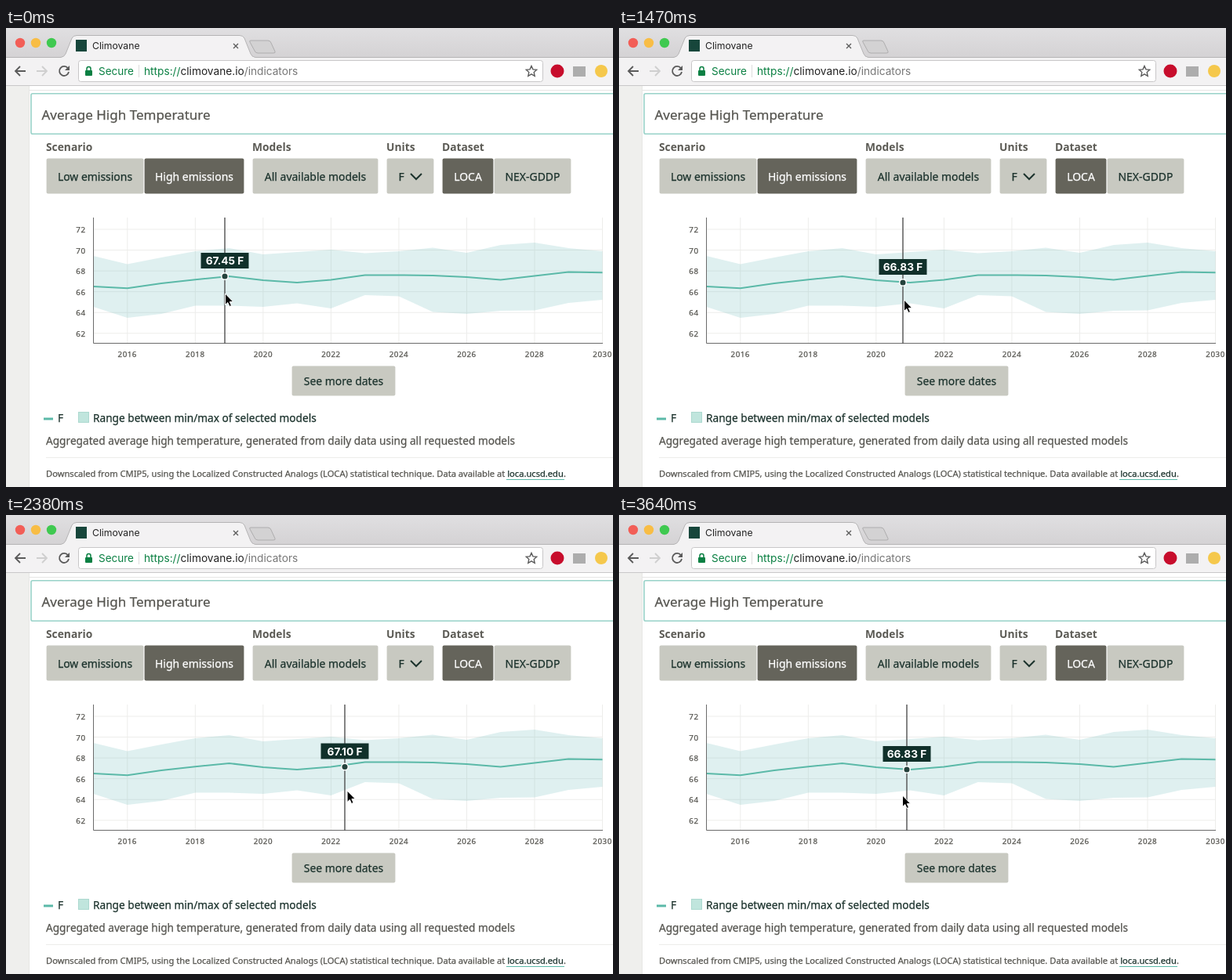
Animation of 774 by 586 pixels, one loop 3.71 s. Source, as an HTML page:

```html
<!DOCTYPE html>
<html lang="en">
<head>
<meta charset="utf-8">
<title>Average High Temperature</title>
<style>
  html, body { margin: 0; width: 774px; height: 586px; overflow: hidden; background: #fff; }
  svg { display: block; font-family: "Noto Sans", "Open Sans", sans-serif; }
  .chrome { font-family: Inter, "Liberation Sans", sans-serif; }
  .label { font-size: 13.8px; font-weight: 700; fill: #5c5b55; }
  .medium { fill: #55544f; stroke: #55544f; stroke-width: .25px; }
  .dark { fill: #1c332d; stroke: #1c332d; }
  .light { fill: #fff; stroke: #fff; }
  .button { font-size: 13.95px; text-anchor: middle; }
  .body { font-size: 13.67px; }
  .tick { font-size: 9.8px; letter-spacing: .5px; }
  .icon { fill: none; stroke: #5a5a5a; stroke-width: 1.8; }
</style>
</head>
<body>
<svg width="774" height="586" viewBox="0 0 774 586">
  <defs>
    <linearGradient id="bar" x2="0" y2="1">
      <stop stop-color="#e0dfe1"/><stop offset="1" stop-color="#d4d2d4"/>
    </linearGradient>
  </defs>

  <g class="chrome">
    <rect width="774" height="38" fill="url(#bar)"/>
    <circle cx="18" cy="19" r="6.2" fill="#f25e57"/>
    <circle cx="38" cy="19" r="6.2" fill="#f8bd45"/>
    <circle cx="58" cy="19" r="6.2" fill="#3fc950"/>
    <path d="M312 16h22q3 0 4 3l5 11q1 2-2 2h-20q-3 0-4-3l-6-11q-1-2 1-2z" fill="#d3d2d3" stroke="#aeadae"/>
    <rect y="37" width="774" height="36" fill="#f3f2f3"/>
    <path d="M0 37.5H70Q74 37 76 33L84 13Q86 9.5 90 9.5H298Q302 9.5 304 13L312 33Q314 37.5 318 37.5H774" fill="#f3f2f3" stroke="#b5b4b5"/>
    <path d="M72 38H316" stroke="#f3f2f3" stroke-width="2"/>
    <rect x="89" y="15" width="14" height="15" fill="#17463b"/>
    <text x="110" y="27" font-size="12.2" fill="#222">Climovane</text>
    <path class="icon" d="M290 20l6 6m0-6l-6 6" style="stroke-width:1.3"/>
    <path class="icon" d="M25 55H12m6-6l-6 6 6 6"/>
    <path class="icon" d="M39 55h13m-6-6l6 6-6 6" style="stroke:#cfcfcf"/>
    <path class="icon" d="M79 51.5A6 6 0 1 0 80 56"/>
    <path d="M81 48v6h-6z" fill="#5a5a5a"/>
    <rect x="92.5" y="41.5" width="592" height="27" rx="3" fill="#fff" stroke="#c8c7c8"/>
    <rect x="101" y="54" width="9" height="7" rx="1" fill="#0b8043"/>
    <path d="M103 54v-2a2.500 2.500 0 0 1 5 0v2" fill="none" stroke="#0b8043" stroke-width="1.5"/>
    <text x="118" y="60" font-size="13.5" fill="#0b8043">Secure</text>
    <path d="M169.5 47v16" stroke="#ddd"/>
    <text x="176" y="60" font-size="13.7" fill="#777"><tspan fill="#0b8043">https://</tspan><tspan fill="#222">climovane.io</tspan>/indicators</text>
    <path class="icon" d="M670 48.500l2 4.400 4.700.5-3.500 3.200 1 4.700-4.200-2.400-4.200 2.400 1-4.700-3.500-3.200 4.700-.5z" style="stroke-width:1.4"/>
    <circle cx="703" cy="55" r="8.5" fill="#c70d2c"/>
    <rect x="723" y="49" width="16" height="13" fill="#adadad"/>
    <circle cx="759" cy="55" r="8" fill="#f5c84c"/>
    <path d="M0 73.5H774" stroke="#c9c8c9"/>
  </g>

  <rect y="74" width="30" height="512" fill="#efefed"/>
  <path d="M29.5 74V586M30 79.5H774" stroke="#e6e6e4"/>
  <rect x="32" y="83.7" width="760" height="51.6" rx="2" fill="#fff" stroke="#98d2c8" stroke-width="1.6"/>
  <text x="45.5" y="117" font-size="17" class="medium">Average High Temperature</text>
  <g id="controls"></g>
  <path d="M516 186l7 7 7-7" fill="none" stroke="#1c332d" stroke-width="2"/>

  <g id="chart"></g>

  <path d="M48 499h12" stroke="#5bb9a8" stroke-width="3"/>
  <text x="66" y="503" class="body medium dark">F</text>
  <rect x="92.5" y="490.5" width="13" height="13" fill="#c0e5dd" stroke="#acd9cf"/>
  <text x="111" y="503" class="body medium dark">Range between min/max of selected models</text>
  <text x="51" y="532" class="body medium">Aggregated average high temperature, generated from daily data using all requested models</text>
  <path d="M51 548.5H774" stroke="#ececea"/>
  <text x="51" y="573" font-size="11.16" class="medium">Downscaled from CMIP5, using the Localized Constructed Analogs (LOCA) statistical technique. Data available at <tspan class="dark">loca.ucsd.edu</tspan>.</text>
  <path d="M638 576.5h74" stroke="#5bb9a8"/>

  <g id="hover">
    <path d="M0 242V403" stroke="#505050" stroke-width="1.4"/>
    <g id="reading">
      <rect x="-30.5" y="-30" width="61" height="20" fill="#10302a"/>
      <text id="value" class="chrome" y="-15" font-size="13.7" font-weight="700" fill="#fff" text-anchor="middle"></text>
      <circle r="4.3" fill="#24423c" stroke="#fff" stroke-width="1.5"/>
    </g>
  </g>
  <path id="cursor" d="M-.5 0V14.500L2.800 11.500 5 16.500 7.500 15.400 5.300 10.600H9.800z" fill="#000" stroke="#fff"/>
</svg>

<script>
const $ = id => document.getElementById(id);

const box = (x, y, width, height, color) =>
  `<rect x="${x - .4}" y="${y - .4}" width="${width + .8}" height="${height + .8}" rx="2" fill="${color}"/>`;
const button = (x, width, text, active, textX = x + width / 2) =>
  box(x, 167, width, 44, active ? '#65645b' : '#c8c9c1') +
  `<text class="button medium ${active ? 'light' : 'dark'}" x="${textX}" y="195">${text}</text>`;
const label = (x, text) => `<text class="label" x="${x}" y="157">${text}</text>`;
$('controls').innerHTML =
  label(51, 'Scenario') + label(314, 'Models') + label(485, 'Units') + label(556, 'Dataset') +
  button(52, 123, 'Low emissions') + button(177, 126, 'High emissions', true) +
  button(315, 159, 'All available models') + button(486, 59, 'F', false, 504) +
  button(557, 64, 'LOCA', true) + button(623, 97, 'NEX-GDDP') +
  box(365, 432, 131, 37, '#c8c9c1') +
  '<text class="button medium dark" x="430.5" y="456">See more dates</text>';

// One y coordinate per year, starting in 2015
const high = [291, 301.5, 293, 285, 281, 289, 286, 283, 287.5, 285, 280.5, 287, 277, 274, 281, 285];
const low = [356, 370, 365, 354.5, 354.5, 356, 351.5, 358, 341, 342.5, 362.5, 365, 361, 360.5, 351, 347];
const mean = [330, 332.3, 326, 321.3, 317, 322, 325, 321.5, 315.6, 315.5, 316, 318, 321.5, 316.5, 311.5, 312.2];
const readings = { 4: '67.45', 5: '67.06', 6: '66.83', 7: '67.10', 8: '67.56' };
const left = 111.5, yearWidth = 43.27;
const points = ys => ys.map((y, i) => [left + i * yearWidth, y]);

let grid = '', ticks = '';
for (let i = 1; i < 16; i += 2) {
  const x = left + i * yearWidth;
  grid += `M${x} 242V402`;
  ticks += `<text class="tick medium" x="${x}" y="420" text-anchor="middle">${2015 + i}</text>`;
}
for (let value = 62; value <= 72; value += 2) {
  const y = 257 + (72 - value) * 13.28;
  grid += `M112 ${y}H760`;
  ticks += `<text class="tick medium" x="101.5" y="${y + 4}" text-anchor="end">${value}</text>`;
}
$('chart').innerHTML =
  `<path d="${grid}" stroke="#ededeb"/>
   <polygon points="${[...points(high), ...points(low).reverse()].join(' ')}" fill="#5fb5b5" fill-opacity=".2"/>
   <polyline points="${points(mean).join(' ')}" fill="none" stroke="#5bb9a8" stroke-width="2"/>
   <path d="M111.5 242V402.5H761" fill="none" stroke="#6b6b6b"/>${ticks}`;

// time, cursor x, cursor y, guide line x
const path = [
  [0, 280, 339, 279], [420, 292, 338, 289], [980, 323, 339, 322], [1470, 364, 347, 362],
  [2030, 403, 352, 392], [2520, 441, 352, 440], [2730, 441, 352, 441],
  [3080, 432, 352, 433], [3640, 362, 358, 367]
];

// Cubic interpolation with flat tangents at turning points
function at(time, column) {
  const slope = i => (path[i + 1][column] - path[i][column]) / (path[i + 1][0] - path[i][0]);
  const tangent = i => {
    if (i === 0) return slope(0);
    if (i === path.length - 1) return slope(i - 1);
    const a = slope(i - 1), b = slope(i);
    return a * b > 0 ? 2 * a * b / (a + b) : 0;
  };
  let i = 0;
  while (i < path.length - 2 && time >= path[i + 1][0]) i++;
  const span = path[i + 1][0] - path[i][0], u = (time - path[i][0]) / span, v = 1 - u;
  return path[i][column] * v * v * (1 + 2 * u) + path[i + 1][column] * u * u * (3 - 2 * u)
    + span * u * v * (tangent(i) * v - tangent(i + 1) * u);
}

function draw(now) {
  const time = Math.floor(now % 3710 / 70) * 70;
  const x = Math.round(at(time, 3));
  const year = Math.round((x - left) / yearWidth);
  $('hover').setAttribute('transform', `translate(${x})`);
  $('reading').setAttribute('transform', `translate(0 ${mean[year]})`);
  $('value').textContent = readings[year] + ' F';
  $('cursor').setAttribute('transform', `translate(${at(time, 1)} ${at(time, 2)})`);
}

const start = performance.now();
function tick() {
  draw(performance.now() - start);
  requestAnimationFrame(tick);
}
tick();
</script>
</body>
</html>
```
